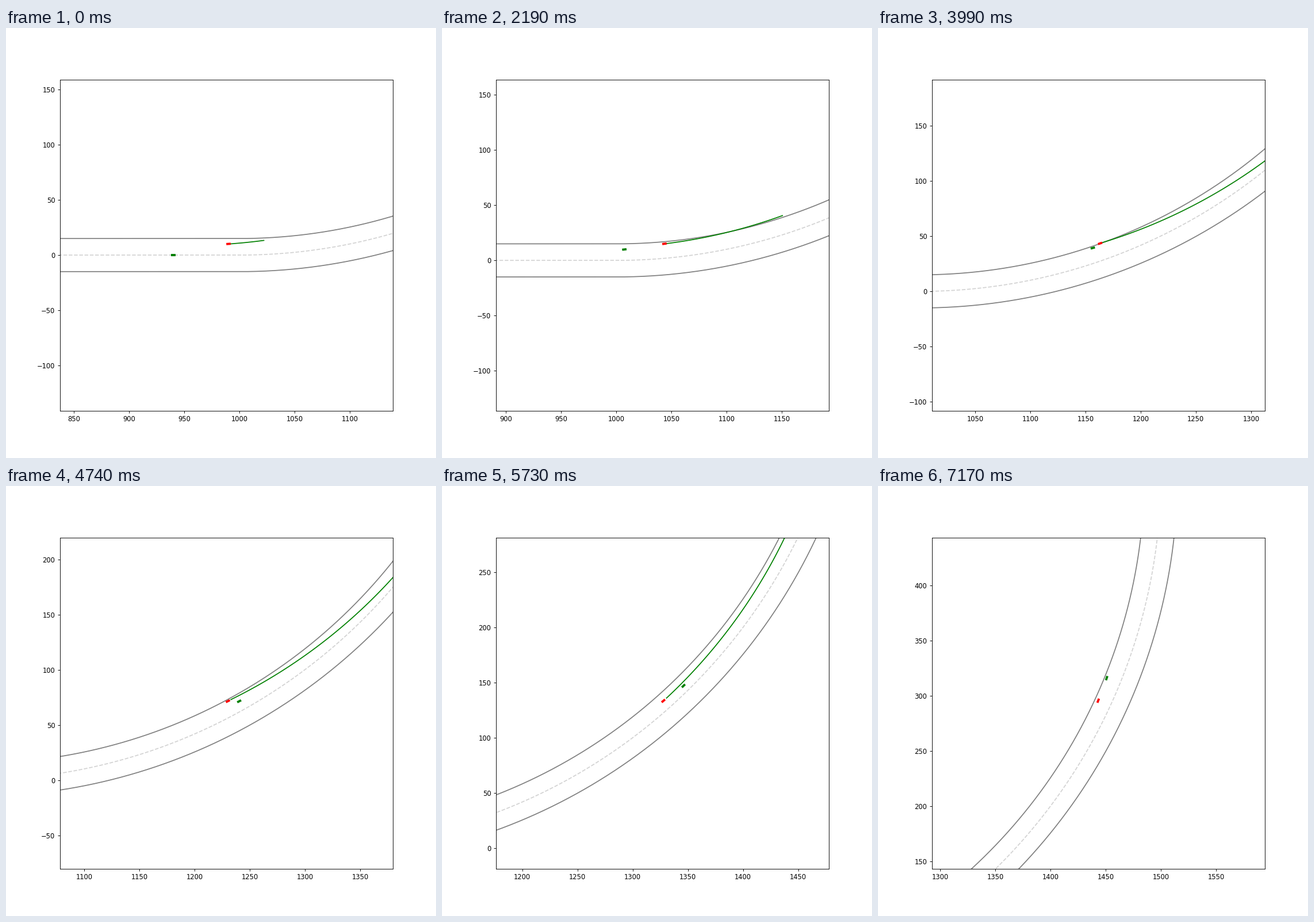
Write a matplotlib script that moves like this. It is 748 px wide and 748 px high and loops after 7.2 s.

```python
import numpy as np
import matplotlib.pyplot as plt
from matplotlib.animation import FuncAnimation
from matplotlib.patches import Rectangle

FRAMES, INTERVAL = 240, 30
SIZE, INCHES = 748, 9
BEND_X, RADIUS, HALF_ROAD = 1000, 500, 15
CAR_L, CAR_W = 4, 2
VIEW_Y = 150
VIEW_X = VIEW_Y * 0.775 / 0.77


def smooth(points, start_slope):
    """Cubic curve through a few points; returns value and slope."""
    xs, ys = np.array(points, float).T
    m = np.gradient(ys, xs, edge_order=2)
    m[0] = start_slope

    def curve(x):
        i = np.clip(np.searchsorted(xs, x, side="right") - 1, 0, len(xs) - 2)
        h = xs[i + 1] - xs[i]
        t = (x - xs[i]) / h
        a, b, c, d = ys[i], ys[i + 1], m[i] * h, m[i + 1] * h
        p, q = 2 * a - 2 * b + c + d, 3 * b - 3 * a - 2 * c - d
        return ((p * t + q) * t + c) * t + a, ((3 * p * t + 2 * q) * t + c) / h

    return curve


def bend(s):
    return np.maximum(s - BEND_X, 0) / RADIUS


def road(s, d):
    """Distance along the centre line and left offset to x, y."""
    turn = bend(s)
    x = np.minimum(s, BEND_X) + (RADIUS - d) * np.sin(turn)
    y = RADIUS - (RADIUS - d) * np.cos(turn)
    return x, y


class Car:
    """Accelerates evenly, then less strongly once it is fast."""

    def __init__(self, color, start, accel, fast_at, ease, offset):
        self.start, self.accel = start, accel
        self.fast_at, self.ease = fast_at, ease
        self.offset = offset
        self.patch = ax.add_patch(Rectangle(
            (0, 0), CAR_L, CAR_W, facecolor=color, zorder=3))

    def dist(self, k):
        late = max(k - self.fast_at, 0)
        return self.start + self.accel * k ** 2 - self.ease * late ** 2

    def move(self, k):
        s = self.dist(k)
        d, slope = self.offset(s)
        x, y = road(s, d)
        self.patch.set_xy((x, y))
        self.patch.set_angle(np.degrees(bend(s) + np.arctan(slope)))
        return x, y


fig, ax = plt.subplots(figsize=(INCHES, INCHES), dpi=SIZE / INCHES)

track = np.linspace(0, BEND_X + 950, 1951)
for side in (HALF_ROAD, -HALF_ROAD):
    ax.plot(*road(track, side), color="gray", lw=1.5)
ax.plot(*road(track, 0), color="lightgray", ls="--", lw=1.5)
plan, = ax.plot([], [], color="green", lw=1.5)

ego = Car("red", 988, 0.01027, 190, 0.0031, smooth(
    [(988, 9), (1105, 14), (1245, 12.6), (1365, 7.2), (1567, 10.8)], 0.067))
rival = Car("green", 938, 0.01265, 153, 0.0096, smooth(
    [(938, -1), (1004, 8.5), (1082, 14), (1254, 7.6), (1386, 4.7),
     (1590, 11.9)], 0))

# Lateral offset the planned path aims for, over time
aim = smooth([(0, 12.8), (35, 10.5), (73, 16.6), (107, 10.2), (158, 5),
              (195, 12), (FRAMES, 12)], 0)


def draw_plan(k):
    if k == FRAMES - 1:
        plan.set_data([], [])
        return
    s, ahead = ego.dist(k), ego.dist(k + 1)
    reach = 32 + 54 * (ahead - s)
    d0 = ego.offset(ahead)[0] + CAR_W / 2
    u = np.linspace(0, 1, 55)
    along = ahead + CAR_L / 2 + (s + reach - ahead) * u
    plan.set_data(*road(along, d0 + (aim(k)[0] - d0) * u))


def update(k):
    x, y = ego.move(k)
    rival.move(k)
    draw_plan(k)
    ax.set_xlim(x - VIEW_X, x + VIEW_X)
    ax.set_ylim(y - VIEW_Y, y + VIEW_Y)
    return []


anim = FuncAnimation(fig, update, frames=FRAMES, interval=INTERVAL,
                     init_func=lambda: update(0), repeat=True, repeat_delay=0)
plt.show()
```
